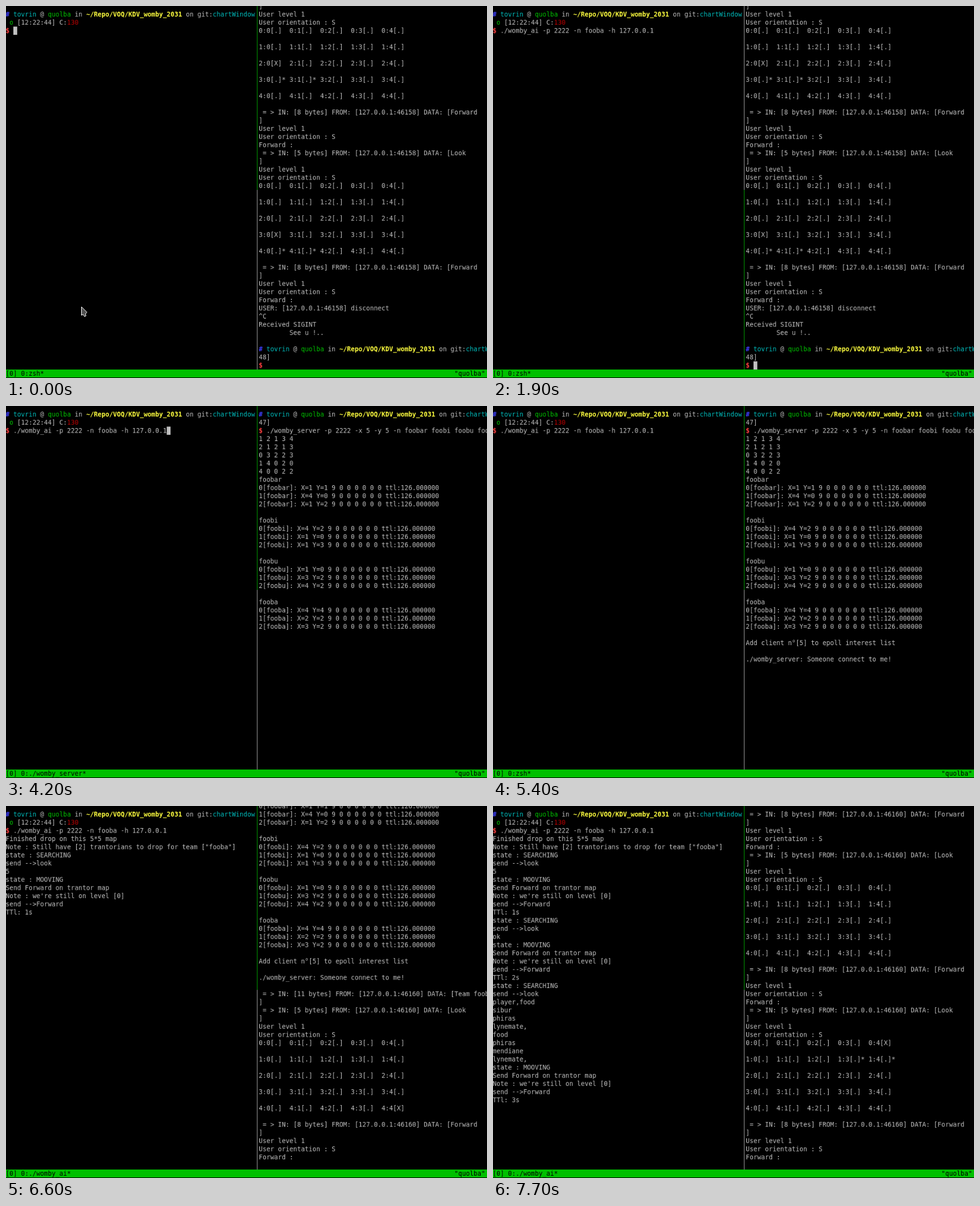
An HTML page with a canvas that plays this animation: 851 px wide and 658 px high, repeating every 8 s.

```html
<!DOCTYPE html>
<html lang="en">
<head>
<meta charset="utf-8">
<title>Terminal session</title>
<style>
html, body { margin: 0; width: 100%; height: 100%; overflow: hidden; background: #000; }
canvas { display: block; }
</style>
</head>
<body>
<canvas id="stage" width="851" height="658"></canvas>
<script>
const CELL = 8, ROW = 17, COLS = 126, ROWS = 46, RIGHT = 66, LOOP = 8000;
const GREY = '#c0c0c0', GREEN = '#00c000', CYAN = '#00c0c0', RED = '#c00000';

const stage = document.getElementById('stage').getContext('2d');
const screen = document.createElement('canvas');
screen.width = COLS * CELL;
screen.height = ROWS * ROW;
const term = screen.getContext('2d');

// A line is a string or a list of [text, colour, bold] runs.
const header = [
  ['# ', '#3f3fff', true], ['tovrin ', CYAN], ['@ '], ['quolba ', GREEN], ['in '],
  ['~/Repo/VOQ/KDV_womby_2031 ', '#ffff3f', true], ['on git:'], ['chartWindow', CYAN]
];
const shell = (cmd = '') => [['$ ', '#ff3f3f', true], [cmd]];

// Left pane: the player client
const leftTop = ['', header, [[' o', GREEN], [' [12:22:44] C:'], ['130', RED]]];
const clientCmd = shell('./womby_ai -p 2222 -n fooba -h 127.0.0.1');
const turn = (ttl, ...seen) => [
  'state : SEARCHING', 'send -->look', ...seen, 'state : MOOVING',
  'Send Forward on trantor map', "Note : we're still on level [0]",
  'send -->Forward', `TTl: ${ttl}s`
];
const turns = [
  ['Finished drop on this 5*5 map',
   'Note : Still have [2] trantorians to drop for team ["fooba"]', ...turn(1, '5')],
  turn(2, 'ok'),
  turn(3, 'player,food', 'sibur', 'phiras', 'lynemate,', 'food', 'phiras', 'mendiane', 'lynemate,')
];

// Right pane: the server
const user = ['User level 1', 'User orientation : S'];
const packet = (port, size, data) =>
  [` = > IN: [${size} bytes] FROM: [127.0.0.1:${port}] DATA: [${data}`, ']'];

function grid(player = '', marks = '') {
  const lines = [];
  for (let y = 0; y < 5; y++) {
    let line = '';
    for (let x = 0; x < 5; x++) {
      const id = `${y}${x}`;
      line += `${y}:${x}[${id === player ? 'X' : '.'}]${marks.split(' ').includes(id) ? '*' : ' '} `;
    }
    lines.push(line, '');
  }
  return lines;
}

const forward = port => [...packet(port, 8, 'Forward'), ...user, 'Forward :'];
const look = (port, ...cells) => [...packet(port, 5, 'Look'), ...user, ...grid(...cells), ...forward(port)];

const oldLog = [
  ...look(46158, '20', '30 31'), ...look(46158, '30', '40 41'),
  'USER: [127.0.0.1:46158] disconnect', '^C', 'Received SIGINT', '        See u !..', '',
  header, '48]', shell()
];
const serverTop = ['', header, '47]',
  shell('./womby_server -p 2222 -x 5 -y 5 -n foobar foobi foobu fooba')];
const team = (name, ...places) => [
  name,
  ...places.map(([x, y], i) => `${i}[${name}]: X=${x} Y=${y} 9 0 0 0 0 0 0 ttl:126.000000`),
  ''
];
const started = [
  ...serverTop, '1 2 1 3 4', '2 1 2 1 3', '0 3 2 2 3', '1 4 0 2 0', '4 0 0 2 2',
  ...team('foobar', '11', '40', '12'), ...team('foobi', '42', '10', '13'),
  ...team('foobu', '10', '32', '42'), ...team('fooba', '44', '22', '32')
];
const joined = [...started, 'Add client n°[5] to epoll interest list', '',
  './womby_server: Someone connect to me!', ''];
const look1 = [...joined, ...packet(46160, 11, 'Team fooba'), ...look(46160, '44')];
const look2 = [...look1, ...look(46160)];
const look3 = [...look2, ...look(46160, '04', '13 14')];

// Each step: [start, value]
const at = (steps, t) => steps.filter(s => s[0] <= t).pop()[1];
const rightLog = [
  [0, oldLog], [3200, serverTop], [3700, started], [4700, joined],
  [5700, [...look1, '']], [6700, [...look2, '']], [7700, [...look3, '']]
];
const turnCount = [[0, 0], [5700, 1], [6700, 2], [7700, 3]];
const title = [[0, 'zsh'], [4200, './womby_server'], [4700, 'zsh'], [5700, './womby_ai']];
const cursor = [
  [0, [2, 3]], [200, null], [400, [42, 3]], [1000, null], [1600, [42, 3]],
  [1900, [RIGHT + 2, 44]], [3200, null], [3700, [RIGHT, 29]], [4200, [42, 3]],
  [4700, [0, 4]], [5400, null], [5900, [0, 14]], [6600, null], [7100, [0, 22]], [7700, null]
];

function fill(colour, col, row, cols, rows) {
  term.fillStyle = colour;
  term.fillRect(col * CELL, row * ROW, cols * CELL, rows * ROW);
}

function print(line, col, row) {
  const runs = typeof line === 'string' ? [[line]] : line;
  for (const [text, colour = GREY, bold] of runs) {
    term.font = `${bold ? 'bold ' : ''}13.333px "DejaVu Sans Mono", monospace`;
    term.fillStyle = colour;
    for (const ch of text) {
      if (ch !== ' ') term.fillText(ch, col * CELL, row * ROW + 13);
      col++;
    }
  }
}

function drawPointer() {
  stage.beginPath();
  for (const [x, y] of [[133.5, 532], [133.5, 547], [136.5, 545.5], [139, 549.5], [141.5, 548], [140.5, 545], [143, 541.5]])
    stage.lineTo(x, y);
  stage.closePath();
  stage.fillStyle = '#505050';
  stage.strokeStyle = '#fff';
  stage.fill();
  stage.stroke();
}

function draw(now) {
  const t = now % LOOP;
  fill('#000', 0, 0, COLS, ROWS);

  const left = [...leftTop, t < 400 ? shell() : clientCmd, ...turns.slice(0, at(turnCount, t)).flat()];
  left.forEach((line, row) => print(line, 0, row));
  at(rightLog, t).slice(-45).forEach((line, row) => print(line, RIGHT, row));

  const rightActive = t >= 1900 && t < 4200;
  fill(rightActive ? GREY : GREEN, 65.5, 0, 1 / CELL, 23);
  fill(rightActive ? GREEN : GREY, 65.5, 23, 1 / CELL, 22);

  fill(GREEN, 0, 45, COLS, 1);
  print([[`[0] 0:${at(title, t)}*`, '#000']], 0, 45);
  print([['"quolba"', '#000']], 117, 45);

  const spot = at(cursor, t);
  if (spot) fill(GREY, ...spot, 1, 1);

  stage.fillStyle = '#000';
  stage.fillRect(0, 0, 851, 658);
  stage.imageSmoothingQuality = 'high';
  stage.drawImage(screen, -0.6, -6.85, screen.width * 0.8482, screen.height * 0.8494);
  if (t < 400) drawPointer();
  requestAnimationFrame(draw);
}
requestAnimationFrame(draw);
</script>
</body>
</html>
```
